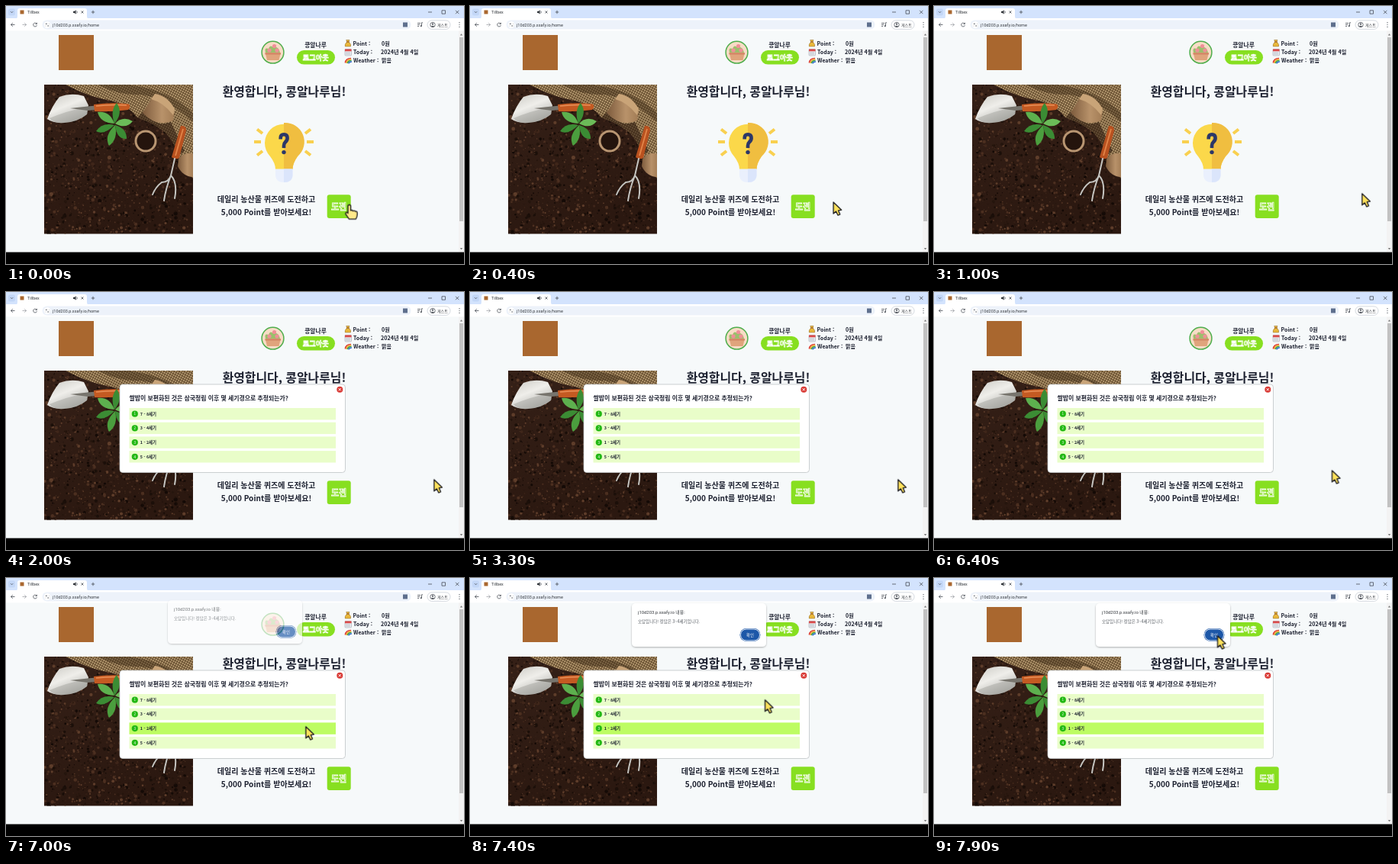
These frames come from a looping animation (600 by 338 pixels, 8000 ms). An HTML page:

```html
<!DOCTYPE html>
<html lang="ko">
<head>
<meta charset="utf-8">
<title>Tillbex</title>
<style>
  html, body { margin: 0; width: 100%; height: 100%; overflow: hidden; background: #000; }
  svg { display: block; width: 100%; height: 100%; }
  text { font-family: "Noto Sans CJK KR", "Noto Sans CJK", "Noto Sans", sans-serif; fill: #1d2130; }
  .b { font-weight: 700; }
  .mid { text-anchor: middle; }
  .ui { font-family: Roboto, "Noto Sans CJK KR", sans-serif; fill: #33373c; }
  .line { fill: none; stroke: #4a4f57; stroke-width: .8; }
  .puffy { fill: #87df20; stroke: #fff; stroke-width: .8; font-weight: 700; text-anchor: middle; }
  .nav { font-size: 7px; font-weight: 700; }
  .row { fill: #e9fdc9; }
  .opt { font-size: 5.4px; font-weight: 700; }
  .num { font-size: 4.6px; fill: #fff; text-anchor: middle; }

  .cursor, .hand, .arrow, .modal, .alert, .picked { animation: 8s infinite both; }
  .cursor { animation-name: move; }
  .hand { animation-name: hand; animation-timing-function: step-end; }
  .arrow { animation-name: arrow; animation-timing-function: step-end; }
  .modal { animation-name: modal; animation-timing-function: step-end; }
  .alert { animation-name: alert; animation-timing-function: step-end; }
  .picked { animation-name: picked; animation-timing-function: step-end; }

  @keyframes move {
    0%, 1.2% { transform: translate(449.7px, 260.5px); animation-timing-function: ease-in-out; }
    12.5%, 77.5% { transform: translate(560.8px, 245.8px); animation-timing-function: ease-in-out; }
    85%, 88.75% { transform: translate(392.8px, 194.8px); animation-timing-function: ease-in-out; }
    98.75%, 100% { transform: translate(371.5px, 75.8px); }
  }
  @keyframes hand { 0% { opacity: 1; } 2.5%, 100% { opacity: 0; } }
  @keyframes arrow { 0% { opacity: 0; } 2.5%, 100% { opacity: 1; } }
  @keyframes modal { 0% { opacity: 0; } 25%, 100% { opacity: 1; } }
  @keyframes picked { 0% { fill: #e9fdc9; } 82.5%, 100% { fill: #bdfc62; } }
  @keyframes alert {
    0% { opacity: 0; transform: translateY(-4px); }
    87.5% { opacity: .66; transform: translateY(-4px); }
    88.75%, 100% { opacity: 1; transform: none; }
  }
</style>
</head>
<body>
<svg viewBox="0 0 600 338">
  <defs>
    <clipPath id="frame"><rect x="50" y="103" width="195" height="195.5"/></clipPath>
    <pattern id="weave" width="3" height="3" patternUnits="userSpaceOnUse" patternTransform="rotate(28)">
      <rect width="3" height="3" fill="#a98b60"/>
      <path d="M0 .5H3M.5 0V3" stroke="#5f4629" stroke-width=".9"/>
      <rect x="1.4" y="1.4" width="1.2" height="1.2" fill="#d6c098"/>
    </pattern>
    <linearGradient id="soil" x2=".3" y2="1">
      <stop stop-color="#352017"/><stop offset="1" stop-color="#2b1810"/>
    </linearGradient>
    <linearGradient id="steel" x2=".6" y2="1">
      <stop stop-color="#c9c8c2"/><stop offset=".5" stop-color="#efeeea"/><stop offset="1" stop-color="#b4b4b0"/>
    </linearGradient>
    <linearGradient id="clay">
      <stop stop-color="#7d5b3d"/><stop offset=".6" stop-color="#b8926a"/><stop offset="1" stop-color="#a27c55"/>
    </linearGradient>
    <filter id="soft" x="-10%" y="-10%" width="120%" height="130%">
      <feDropShadow dx="0" dy="1" stdDeviation="1.3" flood-opacity=".3"/>
    </filter>
  </defs>

  <rect y="32" width="600" height="291" fill="#f6f9fa"/>

  <!-- browser bar -->
  <rect width="600" height="20" fill="#d3e3fd"/>
  <path d="M12 17Q15 17 15 13V6Q15 3 18 3H103Q106 3 106 6V13Q106 17 109 17Z" fill="#fff"/>
  <rect y="16" width="600" height="16.5" fill="#fff"/>
  <rect x="3" y="3.5" width="9" height="9" rx="2.5" fill="#c3d7f7"/>
  <path class="line" d="M6 7.2L7.6 8.8L9.2 7.2M98.5 6.5L101.5 9.5M101.5 6.5L98.5 9.5M114 5.8V10.2M111.8 8H116.2
    M553 8H558M571 5.8H575.5V10.2H571ZM589 5.8L593.4 10.2M593.4 5.8L589 10.2"/>
  <rect x="18.5" y="5.5" width="5" height="5" fill="#a9672f"/>
  <text class="ui" x="28" y="10" font-size="5.4">Tillbex</text>
  <path d="M88 7H89.5L91.5 5.2V10.8L89.5 9H88Z" fill="#33373c"/>
  <path class="line" d="M92.6 6.4Q94 8 92.6 9.6"/>
  <path class="line" d="M11.5 24.5H6.5M8.8 22.2L6.5 24.5L8.8 26.8M40.2 23.4A2.4 2.4 0 1 0 40.4 25.3M40.4 21.8V23.6H38.5"/>
  <path class="line" d="M21.5 24.5H26.5M24.2 22.2L26.5 24.5L24.2 26.8" opacity=".5"/>
  <rect x="47.5" y="18.6" width="483" height="12" rx="6" fill="#edf2fa"/>
  <circle cx="54" cy="24.6" r="4.3" fill="#fff"/>
  <path class="line" d="M51.7 23.4H54M56 23.4H56.4M51.7 26H52M54.2 26H56.4"/>
  <text class="ui" x="61" y="26.5" font-size="5.5">j10d203.p.ssafy.io/home</text>
  <rect x="520" y="21.5" width="6" height="6" fill="#5e6f8d"/>
  <path class="line" d="M539 22.5H543M539 24.5H542M539 26.5H541M544.5 26V21.8H546"/>
  <circle cx="543.8" cy="26.2" r="1" fill="#4a4f57"/>
  <rect x="552" y="18.8" width="30" height="11.6" rx="5.8" fill="#fff" stroke="#b8bfc9" stroke-width=".6"/>
  <circle class="line" cx="559" cy="24.6" r="3.2"/>
  <circle cx="559" cy="23.7" r="1.1" fill="#4a4f57"/>
  <path d="M557 26.7Q559 24.6 561 26.7L559 27.6Z" fill="#4a4f57"/>
  <text class="ui" x="565" y="26.6" font-size="5">게스트</text>
  <path d="M594 21.7v.1M594 24.5v.1M594 27.3v.1" stroke="#4a4f57" stroke-width="1.2" stroke-linecap="round"/>

  <rect x="593" y="32.5" width="7" height="290" fill="#f3f3f3"/>
  <rect x="594" y="41" width="5" height="241" fill="#c1c1c1"/>
  <path d="M594.8 38.5H598.2L596.5 36.2ZM594.8 317H598.2L596.5 319.3Z" fill="#777"/>

  <!-- page header -->
  <rect x="69" y="38" width="46" height="46" fill="#a9672f"/>
  <circle cx="349.5" cy="60.7" r="14.4" fill="#f8dcc6" stroke="#4fae4c" stroke-width="1.5"/>
  <path d="M340 61Q338 54 344 56Q346 50 350 54Q357 52 359 61Z" fill="#9bbf6c"/>
  <path d="M339.5 61H360L357.5 71H342Z" fill="#e0a47c"/>
  <path d="M339.5 62.5H360" stroke="#d08263" stroke-width="2"/>
  <g fill="#ef8f98">
    <circle cx="345" cy="58" r="2.6"/><circle cx="351.5" cy="52.5" r="2.6"/><circle cx="355" cy="58" r="2.6"/>
  </g>
  <text class="b mid" x="405.5" y="53.5" font-size="7.8">콩알나루</text>
  <rect x="381" y="58" width="50" height="18.6" rx="9.3" fill="#87df20"/>
  <text class="puffy" x="405.7" y="70.5" font-size="9.2">로그아웃</text>

  <path d="M445.7 44.5H450L449 47Q452.5 50 451.5 53H444.3Q443.3 50 446.7 47Z" fill="#e9b83c" stroke="#8a6420" stroke-width=".5"/>
  <path d="M446 47H449.8" stroke="#8a4b20"/>
  <rect x="444" y="56.5" width="8.5" height="8.5" rx="1" fill="#eceff3" stroke="#8e939c" stroke-width=".5"/>
  <rect x="444" y="56.5" width="8.5" height="2.8" fill="#d94b4b"/>
  <path d="M445.5 61H451M445.5 63H451" stroke="#7d8592" stroke-width=".9" stroke-dasharray="1"/>
  <g fill="none" stroke-width="1.7">
    <path d="M444.5 74.5Q445 68.5 452 68.5" stroke="#dd3b32"/>
    <path d="M446 75Q446.5 70 452.3 70" stroke="#f0a92a"/>
    <path d="M447.5 75.2Q448 71.5 452.6 71.5" stroke="#3fa64f"/>
    <path d="M449 75.4Q449.3 73 453 73" stroke="#3a6fd0"/>
  </g>
  <g class="nav">
    <text x="454.5" y="51.7">Point :</text><text x="492" y="51.7">0원</text>
    <text x="455" y="62.7">Today :</text><text x="491" y="62.7" font-size="7.2">2024년 4월 4일</text>
    <text x="455" y="73.9">Weather :</text><text x="492" y="73.9">맑음</text>
  </g>

  <!-- garden photo -->
  <g clip-path="url(#frame)">
    <rect x="50" y="103" width="195" height="196" fill="url(#soil)"/>
    <g id="crumbs"></g>
    <path d="M78 103H245V226Q234 214 226 196Q218 172 204 162Q190 152 172 146Q160 130 138 124Q110 120 78 103Z" fill="url(#weave)"/>
    <path d="M120 103Q150 118 176 116Q210 120 245 152V140Q215 110 160 103Z" fill="#3a2815" opacity=".45"/>
    <path d="M172 146L180 138Q196 160 216 152L234 190L226 196Q218 172 204 162Q190 152 172 146Z" fill="#2c1a0e" opacity=".6"/>
    <path d="M54 148Q60 131 70 119Q86 113 102 118L108 130L106 142Q94 152 76 153Q62 154 54 148Z" fill="url(#steel)"/>
    <path d="M57 147Q78 138 106 132L107 141Q94 152 76 153Q62 154 57 147Z" fill="#8d8d88" opacity=".35"/>
    <path d="M84 134L107 131.5L118 130.5V136L107 137Z" fill="#77746d"/>
    <path d="M115 129Q138 126 161 128.5Q164 132 160 136Q138 139 116 138Z" fill="#c45a22"/>
    <path d="M118 131Q138 128.5 158 130" fill="none" stroke="#ea9058" stroke-width="1.5"/>
    <g fill="#3b8c34">
      <path d="M142 154Q136 137 145 127Q154 140 142 154Z"/>
      <path d="M142 154Q123 153 120 139Q136 137 142 154Z" fill="#5db04e"/>
      <path d="M142 156Q128 170 118 164Q126 152 142 156Z"/>
      <path d="M143 156Q147 175 135 183Q128 170 143 156Z" fill="#4b9e3e"/>
      <path d="M143 154Q153 143 166 151Q157 162 143 154Z" fill="#6bbb58"/>
      <path d="M143 156Q158 160 158 174Q145 175 143 156Z"/>
    </g>
    <path d="M179 140L195 115Q212 118 221 135L219 150Q198 160 179 140Z" fill="url(#clay)"/>
    <path d="M190 122L195 115Q212 118 221 135L219 143Q206 126 190 122Z" fill="#c9a478"/>
    <circle cx="183" cy="177" r="14.5" fill="#b99672"/>
    <circle cx="183" cy="177" r="11.5" fill="#24140d"/>
    <path d="M226 200Q236 190 246 194V224Q232 224 225 210Z" fill="url(#clay)"/>
    <path d="M229 157Q236 156 236 163L227 199Q222 202 217 198Z" fill="#b9511f"/>
    <path d="M232 161L222 196" stroke="#e28448" stroke-width="1.8"/>
    <g fill="none" stroke="#c5c5c1" stroke-width="2" stroke-linecap="round">
      <path d="M221 200L216 222M216 222Q213 231 204 231Q196 237 192 247M216 222Q209 240 207 255M216 222Q225 231 221 252"/>
    </g>
  </g>

  <!-- welcome panel -->
  <text class="b mid" x="364.5" y="117.5" font-size="15.9">환영합니다, 콩알나루님!</text>
  <g stroke="#f9d04f" stroke-width="4">
    <path d="M325 178H334M394 178H403M329 161.5L336 167M399 161.5L392 167M329 195.5L336 190M399 195.5L392 190"/>
  </g>
  <path d="M353 214Q353 206 346 197A25 25 0 1 1 382 197Q375.5 206 375.5 214Z" fill="#fbd84a"/>
  <path d="M364 153A25 25 0 0 1 382 197Q375.5 206 375.5 214H364Z" fill="#f0be40"/>
  <path d="M353 213.5H375.5V221Q375.5 231 364 231Q353 231 353 221Z" fill="#eaf0fd"/>
  <path d="M364 213.5H375.5V221Q375.5 231 364 231Z" fill="#dbe5fb"/>
  <path d="M359.7 174.5V173Q359.7 168.3 364 168.3Q368.6 168.3 368.6 173Q368.6 176 366 178.3Q364 180 364 183V186" fill="none" stroke="#2c3768" stroke-width="4.6"/>
  <circle cx="364" cy="191.6" r="2.7" fill="#2c3768"/>
  <g class="b mid" font-size="10.05">
    <text x="341" y="257">데일리 농산물 퀴즈에 도전하고</text>
    <text x="341" y="274">5,000 Point를 받아보세요!</text>
  </g>
  <rect x="420.7" y="247.3" width="31" height="30.7" rx="3" fill="#87df20"/>
  <text class="puffy" x="436" y="266.5" font-size="11">도전</text>

  <!-- quiz -->
  <g class="modal">
    <rect x="149" y="121" width="295.5" height="115.5" rx="4" fill="#fff" stroke="#bfc3c6" stroke-width=".8"/>
    <circle cx="437.3" cy="127.7" r="4" fill="#d93a35"/>
    <path d="M435.7 126.1L438.9 129.3M438.9 126.1L435.7 129.3" stroke="#fff" stroke-width="1"/>
    <text class="b" x="161.5" y="142" font-size="7.9">쌀밥이 보편화된 것은 삼국정립 이후 몇 세기경으로 추정되는가?</text>
    <g id="rows"></g>
  </g>

  <!-- answer message -->
  <g class="alert">
    <rect x="212" y="33" width="176" height="57" rx="5" fill="#fff" filter="url(#soft)"/>
    <text class="ui" x="220" y="47.3" font-size="5.9">j10d203.p.ssafy.io 내용:</text>
    <text x="220" y="59" font-size="5.5" style="fill:#555a61">오답입니다! 정답은 3~4세기입니다.</text>
    <rect x="353.5" y="66" width="27" height="17" rx="8.5" fill="#1c57a8"/>
    <rect x="354.5" y="67" width="25" height="15" rx="7.5" fill="#1c57a8" stroke="#fff" stroke-width=".9"/>
    <text class="mid" x="367" y="76.6" font-size="5.4" style="fill:#fff">확인</text>
  </g>

  <rect y="322.5" width="600" height="15.5"/>

  <g class="cursor">
    <g stroke="#17171c" stroke-width="1.3" stroke-linejoin="round">
      <path class="arrow" d="M0 0V15L3.4 12L6 17.2L8.7 16L6.4 10.8L10.6 10.2Z" fill="#fde25c"/>
      <path class="hand" d="M-1.8 1Q0 -1 1.8 1V7.4Q3.5 6.3 4.8 8Q6.7 6.8 7.8 8.7Q10.2 7.9 10.4 10.3V13Q10.2 16 8.5 18.7H-.3Q-2.6 15.5-4.8 12.2Q-5.2 9.4-2.7 10L-1.8 11Z" fill="#ffe98a"/>
    </g>
  </g>
</svg>
<script>
  const SVG = "http://www.w3.org/2000/svg";
  function add(parent, tag, attrs, label) {
    const node = document.createElementNS(SVG, tag);
    for (const key in attrs) node.setAttribute(key, attrs[key]);
    if (label) node.textContent = label;
    parent.append(node);
  }

  const rows = document.getElementById("rows");
  ["7 - 8세기", "3 - 4세기", "1 - 2세기", "5 - 6세기"].forEach((label, i) => {
    const y = 152 + i * 18.7;
    add(rows, "rect", { class: i === 2 ? "row picked" : "row", x: 161.5, y, width: 270.5, height: 15.4 });
    add(rows, "circle", { cx: 168.8, cy: y + 7.7, r: 4.1, fill: "#22b814" });
    add(rows, "text", { class: "num", x: 168.8, y: y + 9.4 }, String(i + 1));
    add(rows, "text", { class: "opt", x: 175.7, y: y + 9.7 }, label);
  });

  let seed = 7;
  const rand = () => (seed = (seed * 16807) % 2147483647) / 2147483647;
  const crumbs = document.getElementById("crumbs");
  const tones = ["#140a06", "#4c2f20", "#1b0f09", "#5e3d2a", "#25150d", "#3f261a"];
  for (let i = 0; i < 1800; i++) {
    add(crumbs, "circle", {
      cx: (50 + rand() * 195).toFixed(1),
      cy: (103 + rand() * 196).toFixed(1),
      r: (0.5 + rand() * rand() * 2.2).toFixed(2),
      fill: tones[i % tones.length]
    });
  }
</script>
</body>
</html>
```
